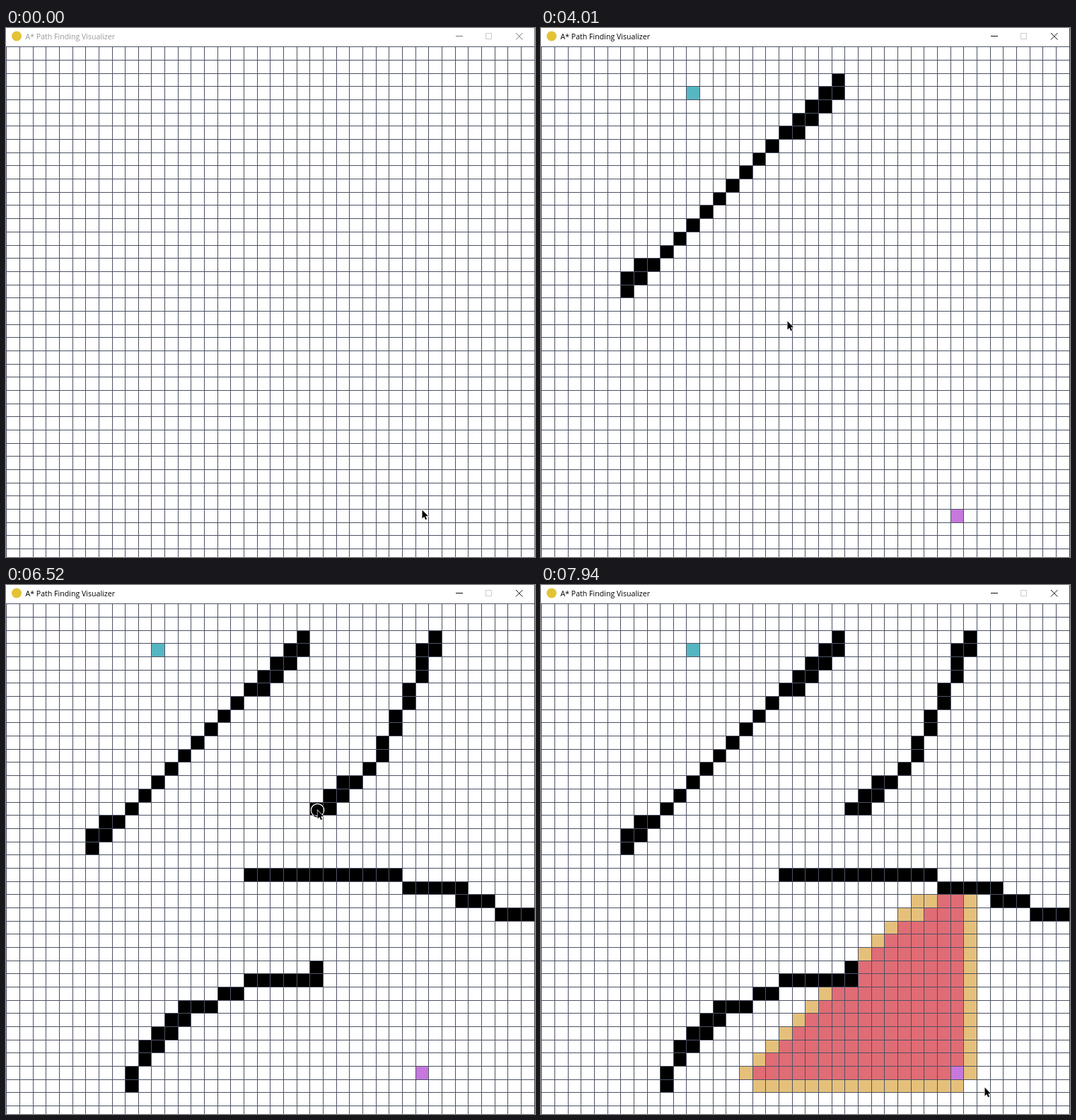
Recreate the animation shown at these times as an HTML page with a canvas. Size 748 by 748 pixels, loop 8000 ms.

```html
<!DOCTYPE html>
<html lang="en">
<head>
<meta charset="utf-8">
<title>A* Path Finding Visualizer</title>
<style>
  html, body { margin: 0; width: 100%; height: 100%; overflow: hidden; background: #fff; }
  canvas { display: block; }
</style>
</head>
<body>
<canvas id="stage" width="748" height="748"></canvas>
<script>
const ctx = document.getElementById('stage').getContext('2d');
const LOOP = 8000, REFRESH = 93.2, SIZE = 748, COUNT = 40;
const CLICK_TIME = 640, SEARCH_TIME = 6808.6, POP_TIME = 8.475;
const COLORS = { start: '#c678dd', goal: '#56b6c2', wall: '#000', open: '#e5c07b', closed: '#e06c75', grid: '#4b5263' };

// Pixel position of grid lines
const CELL = { x: 18.66, y: 18.68 }, TOP = 26.8;
const lineX = i => Math.floor(0.73 + i * CELL.x);
const lineY = i => Math.floor(TOP + i * CELL.y);

const MOVES = { u: [0, -1], d: [0, 1], l: [-1, 0], r: [1, 0], z: [-1, 1], n: [1, 1], e: [1, -1] };

// The mouse rests at a point, or paints cells along a path starting there
const hover = (x, y, from, to = from) => ({ x, y, from, to, cells: [[0, 0]] });
function paint(x, y, from, to, color, path = '', power = 1) {
  const cells = [[Math.floor(x / CELL.x), Math.floor((y - TOP) / CELL.y)]];
  for (const step of path) {
    const [col, row] = cells[cells.length - 1];
    cells.push([col + MOVES[step][0], row + MOVES[step][1]]);
  }
  return { x, y, from, to, color, cells, power };
}

const start = paint(588, 681, CLICK_TIME, 770, COLORS.start);
const goal = paint(216, 93, 2035, 2200, COLORS.goal);
const walls = [
  paint(421, 73, 3225, 3840, COLORS.wall, 'dl'.repeat(4) + 'z'.repeat(10) + 'ldld'),
  paint(348, 414, 4150, 4660, COLORS.wall, 'r'.repeat(11) + 'nrrrrdrrnrr'),
  paint(174, 706, 5205, 5500, COLORS.wall, 'ue' + 'ur'.repeat(4) + 'rererrrru'.replace('err', 'errr')),
  paint(608, 75, 6140, 6510, COLORS.wall, 'dld' + 'dz'.repeat(3) + 'dzz' + 'ld'.repeat(2) + 'l', 2.4)
];
walls[2] = paint(174, 706, 5205, 5500, COLORS.wall, 'ue' + 'ur'.repeat(4) + 'rere' + 'r'.repeat(5) + 'u');
const painted = [...walls, start, goal];
const gestures = [
  ...painted,
  hover(588, 681, 0), hover(588, 681, 1030), hover(224, 234, 1667), hover(209, 162, 1855),
  hover(216, 104, 2300, 2410), hover(348, 414, 3997), hover(260, 626, 4950),
  hover(364, 300, 5860), hover(624, 708, 7073), hover(627, 710, 7250, LOOP)
].sort((a, b) => a.from - b.from);

const clamp = p => Math.min(1, Math.max(0, p));
const mix = (a, b, p) => a + (b - a) * p;
const smooth = p => p * p * (3 - 2 * p);

// Position along the cells of a gesture, as a fractional index
function reached({ from, to, cells, power }, t) {
  return clamp((t - from) / (to - from || 1)) ** (power || 1) * (cells.length - 1);
}

function pointOn(g, t) {
  const at = reached(g, t), i = Math.floor(at);
  const a = g.cells[i], b = g.cells[i + 1] || a;
  return [
    g.x + (mix(a[0], b[0], at - i) - g.cells[0][0]) * CELL.x,
    g.y + (mix(a[1], b[1], at - i) - g.cells[0][1]) * CELL.y
  ];
}

function pointerAt(t) {
  const last = gestures.filter(g => g.from <= t).pop();
  const next = gestures.find(g => g.from > t);
  const [x, y] = pointOn(last, t);
  if (t <= last.to || !next) return [x, y];
  const p = smooth((t - last.to) / (next.from - last.to));
  return [mix(x, next.x, p), mix(y, next.y, p)];
}

// A* with Manhattan distance; ties go to the node queued first
function search(limit) {
  const key = (x, y) => x + y * COUNT;
  const [goalX, goalY] = goal.cells[0];
  const [startX, startY] = start.cells[0];
  const guess = (x, y) => Math.abs(x - goalX) + Math.abs(y - goalY);
  const blocked = new Set(walls.flatMap(w => w.cells.map(c => key(...c))));
  const first = { x: startX, y: startY, g: 0, f: guess(startX, startY), opened: 0 };
  const nodes = new Map([[key(startX, startY), first]]);
  const queue = [first];
  for (let n = 1; n <= limit && queue.length; n++) {
    const lowest = Math.min(...queue.map(node => node.f));
    const [node] = queue.splice(queue.findIndex(q => q.f === lowest), 1);
    for (const side of 'rldu') {
      const x = node.x + MOVES[side][0], y = node.y + MOVES[side][1], k = key(x, y);
      if (x < 0 || y < 0 || x >= COUNT || y >= COUNT || blocked.has(k) || nodes.has(k)) continue;
      const next = { x, y, g: node.g + 1, f: node.g + 1 + guess(x, y), opened: n };
      nodes.set(k, next);
      queue.push(next);
    }
    node.closed = n + 1;
  }
  return [...nodes.values()];
}
const nodes = search(150);

function fillCell(col, row, color) {
  const x = lineX(col), y = lineY(row);
  ctx.fillStyle = color;
  ctx.fillRect(x, y, lineX(col + 1) - x, lineY(row + 1) - y);
}

function stroke(color, ...segments) {
  ctx.strokeStyle = color;
  ctx.lineWidth = 1;
  ctx.beginPath();
  for (const [x1, y1, x2, y2] of segments) {
    ctx.moveTo(x1, y1);
    ctx.lineTo(x2, y2);
  }
  ctx.stroke();
}

function drawTitleBar(active) {
  ctx.fillStyle = '#e3c336';
  ctx.beginPath();
  ctx.arc(15, 11.5, 7, 0, Math.PI * 2);
  ctx.fill();
  ctx.fillStyle = active ? '#000' : '#999';
  ctx.font = '10.6px "Open Sans", "Noto Sans", sans-serif';
  ctx.fillText('A* Path Finding Visualizer', 27.5, 16);
  const ink = active ? '#111' : '#777';
  stroke(ink, [636, 11.5, 646, 11.5], [721, 7, 730.5, 16.5], [730.5, 7, 721, 16.5]);
  ctx.strokeStyle = '#ccc';
  ctx.strokeRect(678.5, 7.5, 8, 8);
}

function drawGrid(active) {
  ctx.fillStyle = COLORS.grid;
  for (let i = 0; i < COUNT; i++) {
    ctx.fillRect(lineX(i), lineY(0), 1, SIZE);
    ctx.fillRect(0, lineY(i), SIZE, 1);
  }
  ctx.fillStyle = active ? '#444' : '#777';
  ctx.fillRect(SIZE - 1, 0, 1, SIZE);
}

const ARROW = new Path2D('M0 0V12L2.8 9.5L4.7 13.7L6.6 12.8L4.7 8.8H8.6Z');
function drawPointer(t) {
  const [x, y] = pointerAt(t);
  ctx.save();
  ctx.translate(Math.round(x) + 0.5, Math.round(y) + 0.5);
  ctx.strokeStyle = '#fff';
  ctx.lineWidth = 1.2;
  if (painted.some(g => t >= g.from && t <= g.to + 50)) {
    ctx.globalCompositeOperation = 'difference';
    ctx.beginPath();
    ctx.arc(0, 0, 9.2, 0, Math.PI * 2);
    ctx.stroke();
    ctx.globalCompositeOperation = 'source-over';
  }
  ctx.stroke(ARROW);
  ctx.fillStyle = '#000';
  ctx.fill(ARROW);
  ctx.restore();
}

function draw(t) {
  const active = t >= CLICK_TIME;
  ctx.fillStyle = '#fff';
  ctx.fillRect(0, 0, SIZE, SIZE);

  const pops = t < SEARCH_TIME ? -1 : Math.floor((t - SEARCH_TIME) / POP_TIME) + 1;
  for (const n of nodes) {
    if (n.opened <= pops) fillCell(n.x, n.y, n.closed <= pops ? COLORS.closed : COLORS.open);
  }
  for (const g of painted.filter(g => t >= g.from)) {
    g.cells.slice(0, 1 + Math.floor(reached(g, t))).forEach(c => fillCell(...c, g.color));
  }

  drawGrid(active);
  drawTitleBar(active);
  drawPointer(t);
}

// The picture holds still between refreshes
function loop() {
  const t = performance.now() % LOOP;
  draw(Math.max(0, Math.floor((t + 10) / REFRESH) * REFRESH - 10));
  requestAnimationFrame(loop);
}
loop();
</script>
</body>
</html>
```
